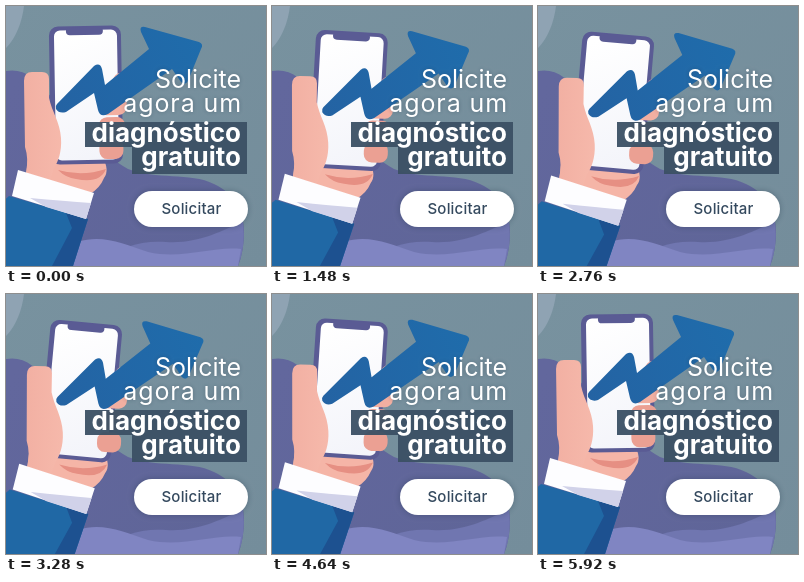
Write an HTML page with a canvas that moves like this. It is 260 px wide and 260 px high and loops after 6000 ms.

```html
<!DOCTYPE html>
<html lang="pt">
<head>
<meta charset="utf-8">
<style>
html, body { margin: 0; width: 100%; height: 100%; overflow: hidden; }
canvas { display: block; width: 260px; height: 260px; }
</style>
</head>
<body>
<canvas width="260" height="260"></canvas>
<script>
const ctx = document.querySelector('canvas').getContext('2d');
const LOOP = 6000, CYCLE = 2000;
const mix = (a, b, k) => a + (b - a) * k;
const ease = x => x * x * x * (10 - 15 * x + 6 * x * x);

function shape(d, fill) {
  ctx.fillStyle = fill;
  ctx.fill(new Path2D(d));
}

function box(x, y, w, h, r, fill) {
  ctx.fillStyle = fill;
  ctx.beginPath();
  ctx.roundRect(x, y, w, h, r);
  ctx.fill();
}

function fade(x0, y0, x1, y1, from, to) {
  const g = ctx.createLinearGradient(x0, y0, x1, y1);
  g.addColorStop(0, from);
  g.addColorStop(1, to);
  return g;
}

// Draws a part shifted by dx, dy and turned by deg about a pivot.
function posed(px, py, dx, dy, deg, draw) {
  ctx.save();
  ctx.translate(px + dx, py + dy);
  ctx.rotate(deg * Math.PI / 180);
  ctx.translate(-px, -py);
  draw();
  ctx.restore();
}

function shaded(blur, draw) {
  ctx.save();
  ctx.shadowColor = 'rgba(30,45,65,.35)';
  ctx.shadowBlur = blur;
  draw();
  ctx.restore();
}

function label(text, x, y, font, color, align = 'right', spacing = 0) {
  ctx.font = font;
  ctx.fillStyle = color;
  ctx.textAlign = align;
  ctx.letterSpacing = spacing + 'px';
  ctx.fillText(text, x, y);
}

function background() {
  ctx.fillStyle = fade(0, 0, 260, 260, '#78929f', '#748d9b');
  ctx.fillRect(0, 0, 260, 260);
  shape('M0 0H18C16 16 10 32 0 42Z', '#8fa3b3');
  shape('M0 65C18 62 30 72 46 92C66 118 96 148 122 163C150 174 184 166 208 178C230 188 238 208 238 225Q238 246 232 260H0Z',
    fade(0, 90, 220, 240, '#62679d', '#5f6598'));
  shape('M90 260C112 240 138 234 160 236C194 238 216 224 237 216Q240 240 232 260Z', '#7076b0');
  shape('M62 260L72 236C96 228 118 238 142 246C176 254 206 240 235 243L232 260Z', '#8085c2');
}

function sleeve() {
  shape('M3 190L82 213L67 260H-8V200Z', '#2068a5');
  shape('M60 207L82 213L67 260H46L66 222Z', '#1d5190');
}

function palm() {
  shape('M22 150H96Q104 164 98 172Q94 182 84 188L20 168Z', '#f5b5a7');
  shape('M52 164Q76 171 100 163Q94 178 70 173Q60 172 52 164Z', '#e68f83');
}

function thumb() {
  shape('M18 75Q18 66 26 66H36Q43 66 43 73V92C46 106 54 116 55 132C56 146 52 156 48 162L44 174L20 168Q23 153 19 141Z',
    fade(18, 0, 56, 0, '#f2b0a3', '#f6b9ab'));
}

function cuff() {
  shape('M12 164L88 187L80 213L6 190Z', '#fdfdff');
  shape('M24 192Q58 195 85 197L80 213L40 201Z', '#d1d2e9');
}

function phone() {
  box(44, 20, 72, 138, 9, '#5a5b94');
  box(49, 24, 63, 130, 6, fade(55, 30, 110, 150, '#ffffff', '#f3f4fa'));
  box(61, 21, 37, 8, 4, '#5a5b94');
}

function fingers() {
  for (let i = 0; i < 4; i++) {
    box(i ? 93 : 108, 67 + i * 22, i ? 30 - i * 2 : 15, 20, 8, i > 1 ? '#eba093' : '#f2afa1');
  }
}

function arrow() {
  shape('M51 98L88 60Q94 56 96 63L99 79L143 43L135 26Q133 20 139 21L193 36Q198 38 195 43L182 75Q179 80 175 76L166 63L102 108Q94 112 92 104L88 87L60 106Q53 108 50 103Q49 100 51 98Z',
    fade(50, 100, 195, 35, '#2463a3', '#1f6cab'));
}

// A small dot that slips out from behind the button and back.
function peek(t) {
  const u = (t % CYCLE - 700) / 540;
  if (u < 0 || u > 1) return;
  const spots = [[142, 194, 0, -10], [234, 203, 9, 0], [230, 199, 5, -8]];
  const [x, y, dx, dy] = spots[Math.floor(t / CYCLE)];
  const k = Math.sin(u * Math.PI);
  ctx.beginPath();
  ctx.arc(x + dx * k, y + dy * k, 4, 0, Math.PI * 2);
  ctx.fillStyle = '#2a6bb0';
  ctx.fill();
  ctx.strokeStyle = '#e8eff8';
  ctx.lineWidth = 1;
  ctx.stroke();
}

function message() {
  box(79, 116, 162, 25, 0, 'rgba(60,81,101,.95)');
  box(126, 141, 115, 27, 0, 'rgba(60,81,101,.95)');
  shaded(4, () => {
    label('Solicite', 235, 82, '400 25px Inter, sans-serif', '#fff');
    label('agora um', 236, 106, '400 25px Inter, sans-serif', '#fff', 'right', 0.9);
  });
  label('diagnóstico', 235, 136, '700 26px Inter, sans-serif', '#fff');
  label('gratuito', 235, 160, '700 26px Inter, sans-serif', '#fff');
}

function button() {
  shaded(6, () => box(128, 185, 114, 36, 18, '#fff'));
  label('Solicitar', 185.5, 208, '500 15px Inter, sans-serif', '#34495e', 'center', 0.2);
}

function draw(t) {
  const phase = (t + CYCLE - 40) % CYCLE / CYCLE;
  const k = ease(1 - Math.abs(2 * phase - 1));
  const arm = part => posed(45, 180, k, 7 * k, 1.2 * k, part);
  background();
  arm(sleeve);
  arm(palm);
  posed(80, 89, -6 * k, 9 * k, mix(-1, 6, k), phone);
  posed(108, 120, -k, 6 * k, mix(-1, 3, k), fingers);
  arm(thumb);
  arm(cuff);
  posed(110, 70, k, 6.5 * k, k, arrow);
  peek(t);
  message();
  button();
}

const start = performance.now();
function tick() {
  draw((performance.now() - start) % LOOP);
  requestAnimationFrame(tick);
}
tick();
</script>
</body>
</html>
```
